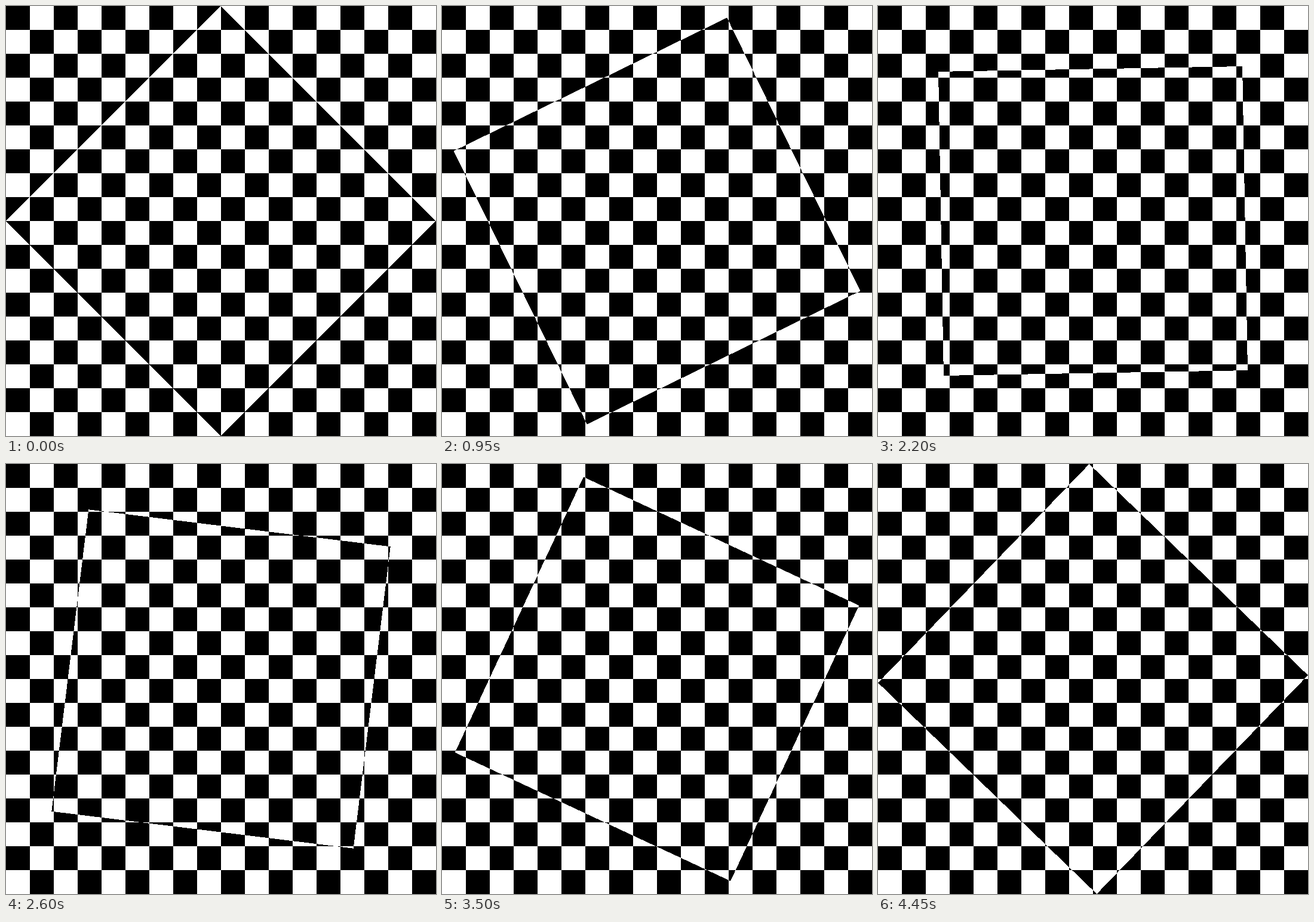
Write an HTML page with a canvas that moves like this. It is 720 by 720 pixels and loops after 4.5 s.

```html
<!DOCTYPE html>
<html lang="en">
<head>
<meta charset="utf-8">
<title>Turning square on a checkerboard</title>
<style>
  html, body { margin: 0; width: 100%; height: 100%; overflow: hidden; background: #fff; }
  canvas { display: block; width: 720px; height: 720px; image-rendering: pixelated; }
</style>
</head>
<body>
<canvas id="stage" width="720" height="720"></canvas>
<script>
const SIZE = 720, MID = SIZE / 2, CELL = 40;
const STEP_MS = 50, STEPS = 90;      // one degree per step, a quarter turn per loop
const HALF = MID * Math.SQRT1_2;     // half the side of the turning square
const EPS = 1e-6;
const BLACK = 0xff000000, WHITE = 0xffffffff;

const ctx = document.getElementById('stage').getContext('2d');
const image = ctx.createImageData(SIZE, SIZE);
const pixels = new Uint32Array(image.data.buffer);

const within = d => d + EPS >= -HALF && d + EPS < HALF;

// Checkerboard with its colours swapped inside the square; hard pixel edges.
function draw(degrees) {
  const angle = (45 + degrees) * Math.PI / 180;
  const c = Math.cos(angle), s = Math.sin(angle);
  for (let y = 0, i = 0; y < SIZE; y++) {
    const dy = y + 0.5 - MID, row = Math.floor(y / CELL);
    for (let x = 0; x < SIZE; x++, i++) {
      const dx = x + 0.5 - MID;
      const odd = (Math.floor(x / CELL) + row) % 2 === 1;
      const inside = within(dx * c + dy * s) && within(dx * s - dy * c);
      pixels[i] = odd !== inside ? WHITE : BLACK;
    }
  }
  ctx.putImageData(image, 0, 0);
}

const start = performance.now();
let shown = 0;

function tick() {
  const step = Math.floor((performance.now() - start) / STEP_MS) % STEPS;
  if (step !== shown) draw(shown = step);
  requestAnimationFrame(tick);
}

draw(0);
requestAnimationFrame(tick);
</script>
</body>
</html>
```
